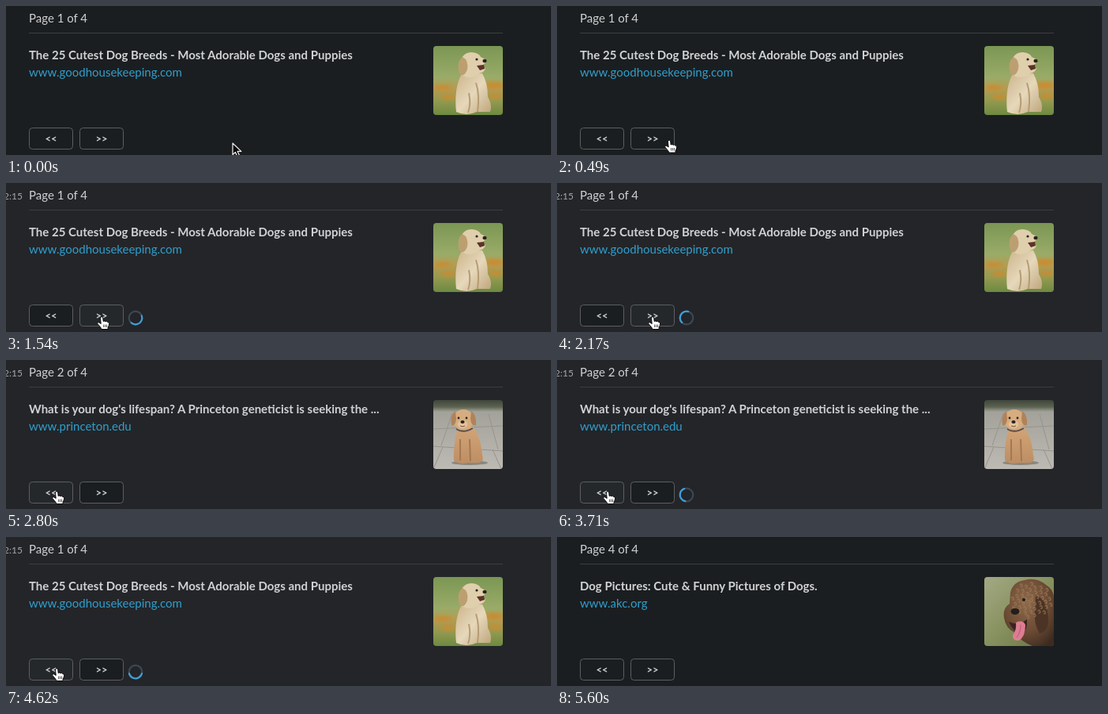
Recreate the animation shown at these times as an HTML page. Size 690 px wide and 190 px high, loop 6160 ms.

```html
<!DOCTYPE html>
<html lang="en">
<head>
<meta charset="utf-8">
<title>Paged search results</title>
<style>
  html, body { margin: 0; width: 100%; height: 100%; overflow: hidden; background: #1b1e20; }
  svg { display: block; width: 690px; height: 190px; }
  text { font: 15px Lato, sans-serif; fill: #d1d2d3; }
  #title { font-weight: 700; }
  #link { fill: #309fcd; }
  #clock { font-size: 12px; fill: #a6a8ab; }
  .btn rect { fill: #1b1e21; stroke: #5c5f62; }
  .btn text { font-size: 13px; font-weight: 700; text-anchor: middle; }
  .btn.over rect { fill: #25282b; }
  #photos > g { display: none; }
  #photos > g.on { display: inline; }
</style>
</head>
<body>
<svg viewBox="0 0 690 190">
  <defs>
    <clipPath id="thumb"><rect width="88" height="88" rx="4"/></clipPath>
    <filter id="soft"><feGaussianBlur stdDeviation="2"/></filter>
    <filter id="fur"><feGaussianBlur stdDeviation=".6"/></filter>
    <linearGradient id="meadow" x2="0" y2="1">
      <stop offset="0" stop-color="#7b9654"/><stop offset=".45" stop-color="#9aab68"/>
      <stop offset=".62" stop-color="#b59b50"/><stop offset=".8" stop-color="#93994f"/>
      <stop offset="1" stop-color="#6d8a41"/>
    </linearGradient>
    <linearGradient id="cream" x2="1" y2="1">
      <stop offset="0" stop-color="#cbb389"/><stop offset=".5" stop-color="#e6d8bb"/>
      <stop offset="1" stop-color="#bda47a"/>
    </linearGradient>
    <linearGradient id="paving" x2="0" y2="1">
      <stop offset="0" stop-color="#3f453b"/><stop offset=".1" stop-color="#5c6350"/>
      <stop offset=".17" stop-color="#a3a29a"/><stop offset="1" stop-color="#bdbab3"/>
    </linearGradient>
    <linearGradient id="gold" x2="0" y2="1">
      <stop offset="0" stop-color="#d2a578"/><stop offset="1" stop-color="#bd8e63"/>
    </linearGradient>
    <linearGradient id="field" x2="1" y2="1">
      <stop offset="0" stop-color="#a4a984"/><stop offset=".5" stop-color="#87915f"/>
      <stop offset="1" stop-color="#66733f"/>
    </linearGradient>
    <radialGradient id="curls" cx=".45" cy=".35" r=".75">
      <stop offset="0" stop-color="#8e6a4b"/><stop offset=".6" stop-color="#6a4a33"/>
      <stop offset="1" stop-color="#3d2b20"/>
    </radialGradient>
  </defs>

  <rect id="row" width="690" height="190"/>
  <text id="clock" x="21" y="21" text-anchor="end">2:15</text>
  <text id="page" x="29" y="21"></text>
  <rect x="29" y="34" width="600" height="1" fill="#3c3f42"/>
  <text id="title" x="29" y="68"></text>
  <text id="link" x="29" y="90"></text>

  <g id="photos" transform="translate(541 51)" clip-path="url(#thumb)">
    <g>
      <rect width="88" height="88" fill="url(#meadow)"/>
      <g filter="url(#soft)" fill="#c98c32">
        <ellipse cx="12" cy="53" rx="11" ry="3"/><ellipse cx="77" cy="50" rx="12" ry="4"/>
        <ellipse cx="19" cy="65" rx="9" ry="3"/><ellipse cx="79" cy="64" rx="8" ry="3"/>
      </g>
      <g filter="url(#fur)">
        <path d="M36 36C29 46 27 68 29 84Q42 90 55 84L72 84Q75 75 69 65Q69 47 62 35Z" fill="url(#cream)"/>
        <path d="M54 47Q59 62 56 84M45 60Q48 74 44 85" fill="none" stroke="#b69c73" stroke-width="2"/>
        <path d="M34 21Q37 8 49 8Q58 9 60 14L66 17Q69 20 65 22L62 25L66 29Q64 34 58 35Q48 43 38 38Q32 31 34 21Z" fill="#e0cfad"/>
        <path d="M37 14Q29 20 33 35Q39 41 43 30Q45 18 37 14Z" fill="#bc9f71"/>
        <path d="M55 25L64 24L65 29L59 31Z" fill="#5d322b"/>
        <ellipse cx="65" cy="19" rx="2.6" ry="2.2" fill="#29211d"/>
        <circle cx="55" cy="17" r="1.6" fill="#2c231c"/>
      </g>
    </g>
    <g>
      <rect width="88" height="88" fill="url(#paving)"/>
      <path d="M0 37L88 33M0 59L88 65M24 17L10 58M70 18L82 63M12 60L0 88M75 63L86 88" stroke="#96948c" fill="none"/>
      <ellipse cx="46" cy="80" rx="23" ry="3" fill="#898780" filter="url(#fur)"/>
      <g filter="url(#fur)">
        <path d="M31 34Q25 59 26 77Q33 83 43 80L57 80Q65 79 62 71Q60 46 50 34Z" fill="url(#gold)"/>
        <path d="M34 50V77M46 50L47 78" stroke="#a47851" stroke-width="2"/>
        <path d="M29 37Q38 43 50 36" stroke="#594d49" stroke-width="2" fill="none"/>
        <ellipse cx="38" cy="25" rx="13" ry="13" fill="#d6ad80"/>
        <path d="M28 14Q21 19 23 32Q28 34 29 24ZM48 14Q55 19 54 32Q48 34 47 24Z" fill="#b18258"/>
        <ellipse cx="37" cy="31" rx="6" ry="5" fill="#e3c39a"/>
        <ellipse cx="37" cy="28" rx="2.6" ry="2" fill="#2a211d"/>
        <circle cx="32" cy="23" r="1.4" fill="#30241c"/><circle cx="42" cy="23" r="1.4" fill="#30241c"/>
        <path d="M34 33Q37 35 40 33" stroke="#75513f" fill="none"/>
      </g>
    </g>
    <g>
      <rect width="88" height="88" fill="url(#field)"/>
      <g filter="url(#fur)">
        <path d="M33 20Q36 6 51 4Q66 0 78 10Q88 16 88 27V88H61Q47 83 39 71Q27 66 25 52Q23 40 32 34Z" fill="url(#curls)"/>
        <path d="M65 23Q79 28 81 52Q82 69 70 72Q62 59 64 40Z" fill="#4b3426"/>
        <path id="fluff" fill="none" stroke="#a17c59" stroke-width="1.5" opacity=".65"/>
        <path d="M31 57Q43 63 54 54Q55 67 48 74Q37 71 31 57Z" fill="#392321"/>
        <path d="M40 58Q49 54 52 61Q52 76 44 81Q35 82 36 74Q41 68 40 58Z" fill="#dd7d93"/>
        <path d="M46 61Q46 71 41 77" stroke="#b95771" fill="none"/>
        <ellipse cx="39" cy="44" rx="5.5" ry="4" fill="#231e1e"/>
        <circle cx="50" cy="29" r="2" fill="#211b18"/>
      </g>
    </g>
  </g>

  <g class="btn"><rect x="29.5" y="155.5" width="55" height="27" rx="4"/><text x="57" y="173.5">&lt;&lt;</text></g>
  <g class="btn"><rect x="93.5" y="155.5" width="55" height="27" rx="4"/><text x="121" y="173.5">&gt;&gt;</text></g>

  <g id="spin" fill="none" stroke-width="2.2">
    <circle r="8.3" stroke="#3c4854"/>
    <circle r="8.3" stroke="#409fd8" pathLength="360" stroke-dasharray="150 210" transform="rotate(-165)" stroke-linecap="round"/>
  </g>

  <g id="cursor">
    <path id="arrow" d="M0 0V14.5L3.4 11.4L5.7 16.5L8.4 15.3L6.1 10.4H10.8Z" fill="#080808" stroke="#f2f2f2" stroke-width="1.2" stroke-linejoin="round"/>
    <g id="hand" transform="translate(.5 -.5)">
      <path d="M-2 2Q-2 0 -.4 0Q1.2 0 1.3 2L1.7 6Q3.4 4.8 4.6 6.2Q6.2 5.2 7.1 6.9Q9.2 6.5 9.1 8.8Q9 11.5 7.6 13.5V16H-.6Q-1.2 13.8 -3.3 11.7L-5.8 8.7Q-6.2 6.6 -3.8 7.3L-1.3 9Z" fill="#fff" stroke="#0a0a0a" stroke-linejoin="round"/>
      <path d="M2.1 10V13.5M4.1 10V13.5M6 10V13.5" stroke="#222" stroke-width=".8"/>
    </g>
  </g>
</svg>
<script>
const LOOP = 6160, STEP = 70;
const $ = id => document.getElementById(id);
const show = (el, on) => { el.style.visibility = on ? "visible" : "hidden"; };

const results = [
  { no: 1, title: "The 25 Cutest Dog Breeds - Most Adorable Dogs and Puppies", link: "www.goodhousekeeping.com" },
  { no: 2, title: "What is your dog's lifespan? A Princeton geneticist is seeking the ...", link: "www.princeton.edu" },
  { no: 4, title: "Dog Pictures: Cute & Funny Pictures of Dogs.", link: "www.akc.org" }
];
const turns = [[0, 0], [2240, 1], [3780, 0], [5040, 2]];      // time, result
const loads = [[1190, 2240], [2870, 3780], [4130, 5040]];     // spinner on, off
const path = [                                                // time, x, y
  [0, 287, 175], [630, 121, 171], [2520, 121, 171],
  [2800, 64, 168], [5390, 64, 168], [5600, 60, 194]
];
const photos = [...$("photos").children];
const buttons = [...document.querySelectorAll(".btn")];
const lefts = [29, 93];

// curly coat
let curls = "";
for (let i = 0; i < 44; i++) {
  const a = i * 2.4, r = 4.6 * Math.sqrt(i);
  curls += `M${(58 + r * Math.cos(a) * .85).toFixed(1)} ${(29 + r * Math.sin(a) * .75).toFixed(1)}q2-3 3 0t-2 2`;
}
$("fluff").setAttribute("d", curls);

function pointer(t) {
  const i = path.findIndex(p => p[0] > t);
  if (i < 0) return null;
  const [t0, x0, y0] = path[i - 1], [t1, x1, y1] = path[i];
  const k = (t - t0) / (t1 - t0), e = k * k * (3 - 2 * k);
  return [x0 + (x1 - x0) * e, y0 + (y1 - y0) * e];
}

const buttonAt = (x, y) => y > 155 && y < 183 ? lefts.findIndex(l => x > l && x < l + 56) : -1;

let shown = -1;
function setResult(n) {
  if (n === shown) return;
  shown = n;
  const r = results[n];
  $("page").textContent = `Page ${r.no} of 4`;
  $("title").textContent = r.title;
  $("link").textContent = r.link;
  photos.forEach((p, i) => p.classList.toggle("on", i === n));
}

function draw(t) {
  setResult(turns.filter(s => s[0] <= t).pop()[1]);

  const hover = t >= 840 && t < 5530;
  $("row").setAttribute("fill", hover ? "#232529" : "#1b1e20");
  show($("clock"), hover);

  const load = loads.find(([on, off]) => t >= on && t < off);
  show($("spin"), load);
  if (load) $("spin").setAttribute("transform", `translate(164 172) rotate(${60 + (t - load[0]) * .245})`);

  const p = pointer(t), over = p ? buttonAt(...p) : -1;
  buttons.forEach((b, i) => b.classList.toggle("over", hover && i === over));
  show($("arrow"), p && over < 0);
  show($("hand"), over >= 0);
  if (p) $("cursor").setAttribute("transform", `translate(${p[0]} ${p[1]})`);
}

const start = performance.now();
function tick() {
  const t = (performance.now() - start) % LOOP;
  draw(Math.floor(t / STEP) * STEP);
  requestAnimationFrame(tick);
}
tick();
</script>
</body>
</html>
```
